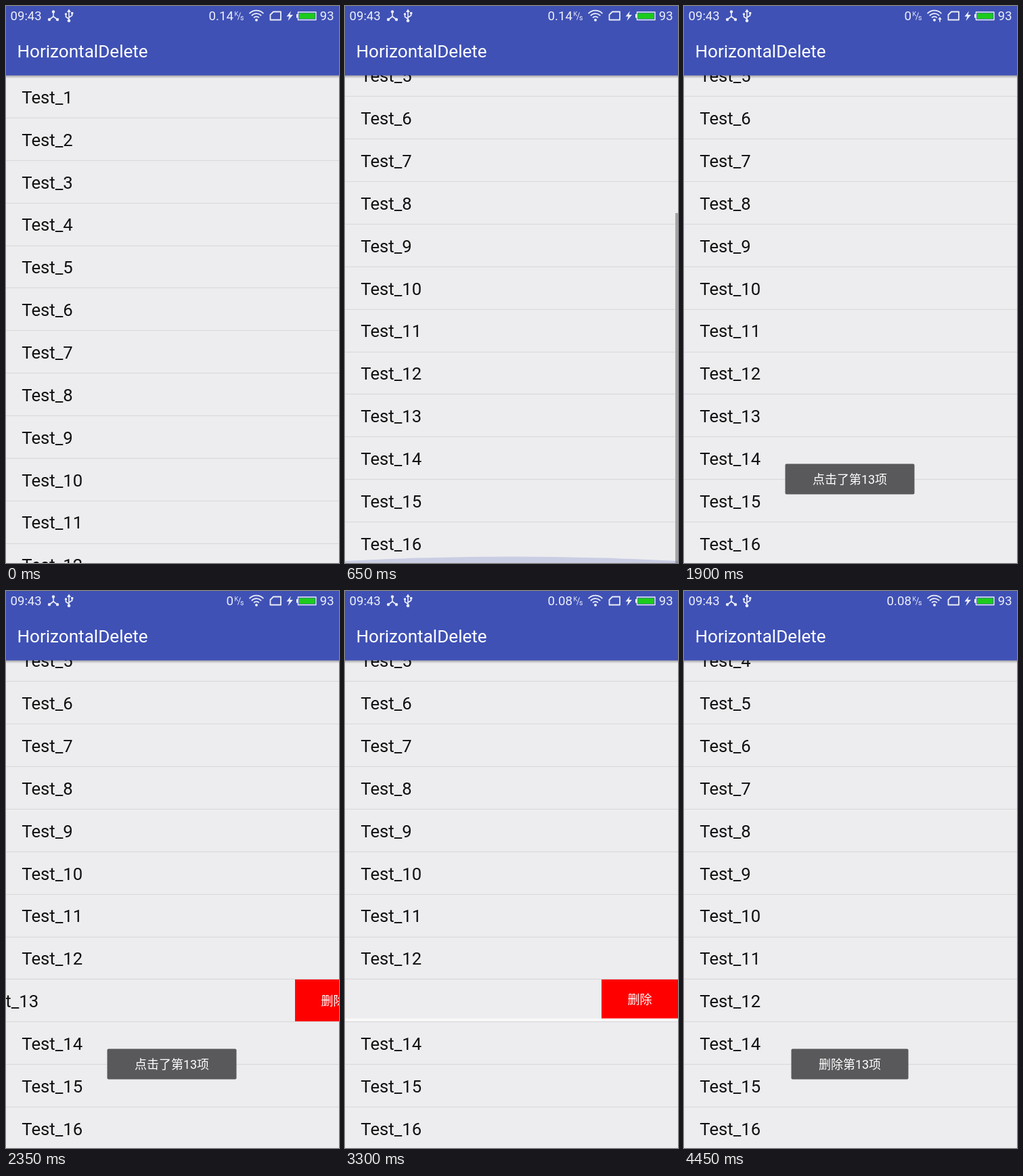
These frames come from a looping animation (492x823 px, 4.5 s). An HTML page with a canvas:

```html
<!DOCTYPE html>
<html lang="zh-CN">
<head>
<meta charset="utf-8">
<title>HorizontalDelete</title>
<style>
html, body { margin: 0; width: 100%; height: 100%; overflow: hidden; background: #ededef; }
canvas { display: block; }
</style>
</head>
<body>
<canvas id="stage" width="492" height="823"></canvas>
<script>
const W = 492, H = 823, LOOP = 4500, STEP = 50;
const BAR = 102.85, ROW = 62.85, MAX_SCROLL = 283, DELETE_W = 113;
const PRIMARY = '#3f51b5', PAPER = '#ededef', PALE = '#eceef8';
const ctx = document.getElementById('stage').getContext('2d');

// Progress of t between two times, clamped to 0..1
const span = (t, from, to) => Math.min(1, Math.max(0, (t - from) / (to - from)));
const easeOut = u => 1 - (1 - u) ** 2;
const easeInOut = u => (1 - Math.cos(Math.PI * u)) / 2;

function rect(x, y, w, h, color) {
  ctx.fillStyle = color;
  ctx.fillRect(x, y, w, h);
}

function text(str, x, y, size, color, align = 'left') {
  ctx.font = `${size}px Roboto, "Noto Sans CJK SC", "Noto Sans CJK", sans-serif`;
  ctx.textAlign = align;
  ctx.fillStyle = color;
  ctx.fillText(str, x, y);
}

function dot(x, y, r) {
  ctx.beginPath();
  ctx.arc(x, y, r, 0, 7);
  ctx.fill();
}

function stroke(path, width) {
  ctx.lineWidth = width;
  ctx.stroke(new Path2D(path));
}

function deleteRow(t, top) {
  const shift = DELETE_W * easeOut(span(t, 2270, 2500));
  const h = 62 * (1 - easeInOut(span(t, 3266, 3466)));
  text('Test_13', 23.3 - shift, top + 41, 25.7, '#111');
  if (!shift) return;
  if (h < 62) rect(0, top + h, W, 62 - h, '#f9f9fa');
  ctx.save();
  ctx.beginPath();
  ctx.rect(W - shift, top, DELETE_W, h);
  ctx.clip();
  rect(W - shift, top, DELETE_W, h, '#f00');
  text('删除', W - shift + DELETE_W / 2, top + h / 2 + 7, 18, '#fff', 'center');
  ctx.restore();
}

function list(t) {
  const scroll = MAX_SCROLL * span(t, 320, 620) ** 1.4;
  const removed = t >= 3466;
  rect(0, 0, W, H, PAPER);
  for (let i = 1; i <= 16; i++) {
    if (removed && i === 13) continue;
    const slot = removed && i < 13 ? i : i - 1;
    const top = BAR + slot * ROW - scroll;
    if (i === 13) deleteRow(t, Math.round(top));
    else text('Test_' + i, 23.3, top + 41, 25.7, '#111');
    rect(0, Math.round(top + 62.2) - 0.2, W, 1.2, '#d9d9dd');
  }

  const thumb = t < 350 ? 0 : 1 - span(t, 900, 1150);
  ctx.globalAlpha = thumb;
  rect(488, 103 + scroll * 0.717, 4, 517, '#a5a5a8');

  // Overscroll glow at the bottom edge
  const glow = span(t, 580, 650) * (1 - span(t, 650, 900));
  ctx.globalAlpha = 0.2;
  ctx.fillStyle = PRIMARY;
  if (glow) {
    const edge = H - 3 * glow;
    ctx.beginPath();
    ctx.moveTo(0, H);
    ctx.lineTo(0, edge);
    ctx.quadraticCurveTo(W / 2, edge - 13 * glow, W, edge);
    ctx.lineTo(W, H);
    ctx.fill();
  }
  ctx.globalAlpha = 1;
}

function statusIcons(t) {
  ctx.fillStyle = ctx.strokeStyle = PALE;
  ctx.lineJoin = 'round';

  stroke('M70 9V15.5L64 20M70 15.5L76 20', 1.6);
  dot(70, 8.5, 2.2);
  dot(64, 20, 2.2);
  dot(76, 20, 2.2);

  stroke('M93 8V22M93 19L88.5 16V12M93 17L97.7 14V10', 1.6);
  ctx.fill(new Path2D('M93 4.5L96 9H90Z'));
  dot(93, 21.7, 2.3);
  dot(88.5, 12, 1.7);
  ctx.fillRect(96.1, 9, 3.2, 3.2);

  for (const r of [5.3, 9.8, 14.3]) {
    ctx.lineWidth = 1.8;
    ctx.beginPath();
    ctx.arc(370, 21, r, -Math.PI * 0.76, -Math.PI * 0.24);
    ctx.stroke();
  }
  dot(370, 20.8, 2);
  if ((t >= 1850 && t < 2300) || (t >= 4250 && t < 4400)) {
    rect(374.5, 15.5, 6.5, 8.5, PRIMARY);
    ctx.fillStyle = PALE;
    ctx.fill(new Path2D('M378 16L380.7 20H378.8V23.5H377.2V20H375.3Z'));
  }

  stroke('M395 8.5H406V20.5H390.5V13Z', 1.8);
  ctx.fill(new Path2D('M421 7.5L414.5 15.5H418.5L416.5 22L424 13H419.5Z'));
  rect(429, 12, 2, 5.5, PALE);
  stroke('M431.5 9H458V20.5H431.5Z', 1.4);
  rect(433, 10.5, 23.5, 8.5, '#1ccb1c');
}

function header(t) {
  const shade = ctx.createLinearGradient(0, 102, 0, 107);
  shade.addColorStop(0, 'rgba(0,0,0,.34)');
  shade.addColorStop(1, 'rgba(0,0,0,0)');
  rect(0, 102, W, 5, shade);
  rect(0, 0, W, 102.5, PRIMARY);
  text('HorizontalDelete', 16.4, 76.3, 26.1, '#fff');

  const speed = t < 1050 ? '0.14' : t < 3250 ? '0' : '0.08';
  text('09:43', 6.6, 21, 18.5, PALE);
  text(speed, 336, 21, 18.8, PALE, 'right');
  text('K', 337.5, 15, 9, PALE);
  text('s', 346, 20.5, 10.5, PALE);
  text('93', 463.8, 21, 18.5, PALE);
  statusIcons(t);
  stroke('M342.5 20.5L346.5 9.5', 1);
}

function toast(str, width, alpha) {
  ctx.globalAlpha = alpha;
  ctx.fillStyle = '#59595b';
  ctx.beginPath();
  ctx.roundRect(245 - width / 2, 676.5, width, 45, 2);
  ctx.fill();
  text(str, 245, 706, 18, '#fff', 'center');
  ctx.globalAlpha = 1;
}

function draw(now) {
  const t = Math.floor((now % LOOP) / STEP) * STEP;
  list(t);
  header(t);
  toast('点击了第13项', 191, easeOut(span(t, 1112, 1612)) * (1 - span(t, 2695, 3180) ** 2));
  toast('删除第13项', 173, easeOut(span(t, 3320, 3660)));
}

const start = performance.now();
function tick() {
  draw(performance.now() - start);
  requestAnimationFrame(tick);
}
tick();
</script>
</body>
</html>
```
